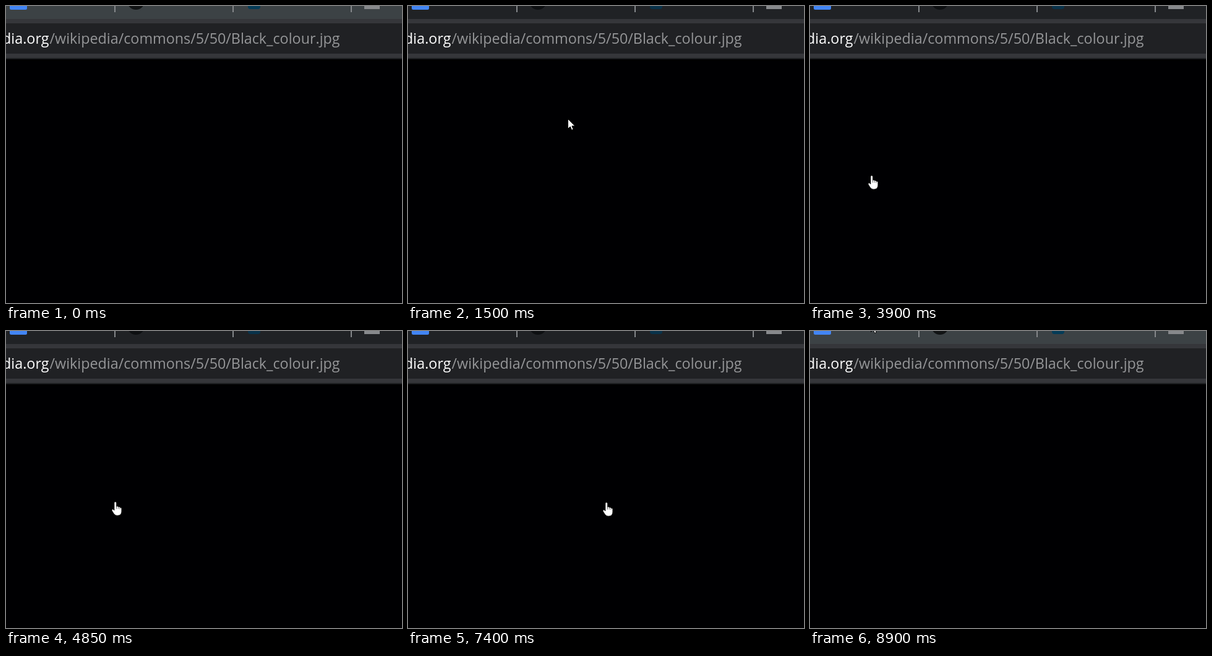
These frames come from a looping animation (640 by 480 pixels, 8.95 s). An HTML page:

```html
<!DOCTYPE html>
<html lang="en">
<head>
<meta charset="utf-8">
<title>Address bar</title>
<style>
  html, body { margin: 0; width: 100%; height: 100%; overflow: hidden; background: #000; }
  svg { display: block; width: 100%; height: 100%; }
  text { font: 23.3px "Open Sans", "Noto Sans", sans-serif; }
</style>
</head>
<body>
<svg viewBox="0 0 640 480">
  <rect width="640" height="480" fill="#000002"/>
  <rect id="strip" width="640" height="21"/>
  <rect x="6" y="-22" width="28" height="28" rx="2.5" fill="#4285f4"/>
  <circle id="disc" cx="210" cy="-8" r="14"/>
  <rect id="tile" x="391" y="-15" width="20" height="20" rx="4"/>
  <rect x="579" y="-21" width="25" height="26" fill="#87898c"/>
  <path d="M176 0V10M367 0V10M558 0V10" stroke="#85888b" stroke-width="2"/>
  <rect y="21" width="640" height="65" fill="#35363a"/>
  <rect y="28" width="640" height="49" fill="#202124"/>
  <rect y="84" width="640" height="2" fill="#1e2022"/>
  <text x="69.5" y="61" text-anchor="end" fill="#fff">wikimedia.org</text>
  <text x="70.5" y="61" fill="#959698">/wikipedia/commons/5/50/Black_colour.jpg</text>
  <path id="arrow" fill="#fff" stroke="#000" d="M.5 .5V16.5L4.2 13L6.6 18.5L9.2 17.4L6.9 12H11.8Z"/>
  <g id="hand" stroke="#000" stroke-width=".6">
    <path fill="#fff" d="M5 15V2.8Q5 1 6.7 1T8.4 2.8V8.6Q10.6 7.4 11.2 9.2Q13.4 8.4 14 10.2Q16.8 9.8 16.8 12V16.5Q16.8 23.2 10 23.2Q6.5 23.2 4.5 20.5L1.2 15.2Q1 12 3.4 13.4Z"/>
    <path fill="none" d="M8.5 8.5V12.5M11.3 9.5V12.5M14 10.5V13"/>
  </g>
</svg>
<script>
const LOOP = 8950, STEP = 50, MOVE = 350;
const BLUR_AT = 1500, FOCUS_AT = 8850;
const HAND_FROM = 2500, HAND_TO = 8000;

// Each move: start time, x, y. The pointer rests until the next one.
const enter = [
  [0, 3, 38], [200, 523, 48], [400, 380, 32], [750, 391, 21],
  [1200, 250, 191], [1700, 3, 49], [2000, 71, 233]
];
// Hops along one hidden line of links that slopes gently down.
const hops = [
  [2350, 61], [3200, 93], [3900, 157], [4700, 189],
  [5200, 212], [6300, 256], [7050, 314]
].map(([t, x]) => [t, x, Math.min(276, 271 + x / 45)]);
const leave = [[7900, 523, 45], [8200, 3, 42], [8500, 98, -15], [8900, 85, -24]];
const moves = [...enter, ...hops, ...leave];

const [strip, disc, tile, arrow, hand] =
  ["strip", "disc", "tile", "arrow", "hand"].map(id => document.getElementById(id));

const ease = u => u * u * (3 - 2 * u);

function pointerAt(t) {
  const i = moves.findLastIndex(m => m[0] <= t);
  const [start, x, y] = moves[i];
  const [, x0, y0] = moves.at(i - 1);
  const end = i + 1 < moves.length ? moves[i + 1][0] : LOOP;
  const k = ease(Math.min(1, (t - start) / Math.min(MOVE, end - start)));
  return [x0 + (x - x0) * k, y0 + (y - y0) * k].map(Math.round);
}

function draw(ms) {
  const t = Math.floor((ms % LOOP) / STEP) * STEP;
  const focused = t < BLUR_AT || t >= FOCUS_AT;
  const linked = t >= HAND_FROM && t < HAND_TO;
  const place = `translate(${pointerAt(t)})`;

  strip.setAttribute("fill", focused ? "#3c4245" : "#202225");
  disc.setAttribute("fill", focused ? "#111314" : "#0d0f11");
  tile.setAttribute("fill", focused ? "#043b57" : "#08324a");
  arrow.setAttribute("transform", place);
  hand.setAttribute("transform", place);
  arrow.setAttribute("display", linked ? "none" : "inline");
  hand.setAttribute("display", linked ? "inline" : "none");
}

const start = performance.now();
function tick() {
  draw(performance.now() - start);
  requestAnimationFrame(tick);
}
tick();
</script>
</body>
</html>
```
